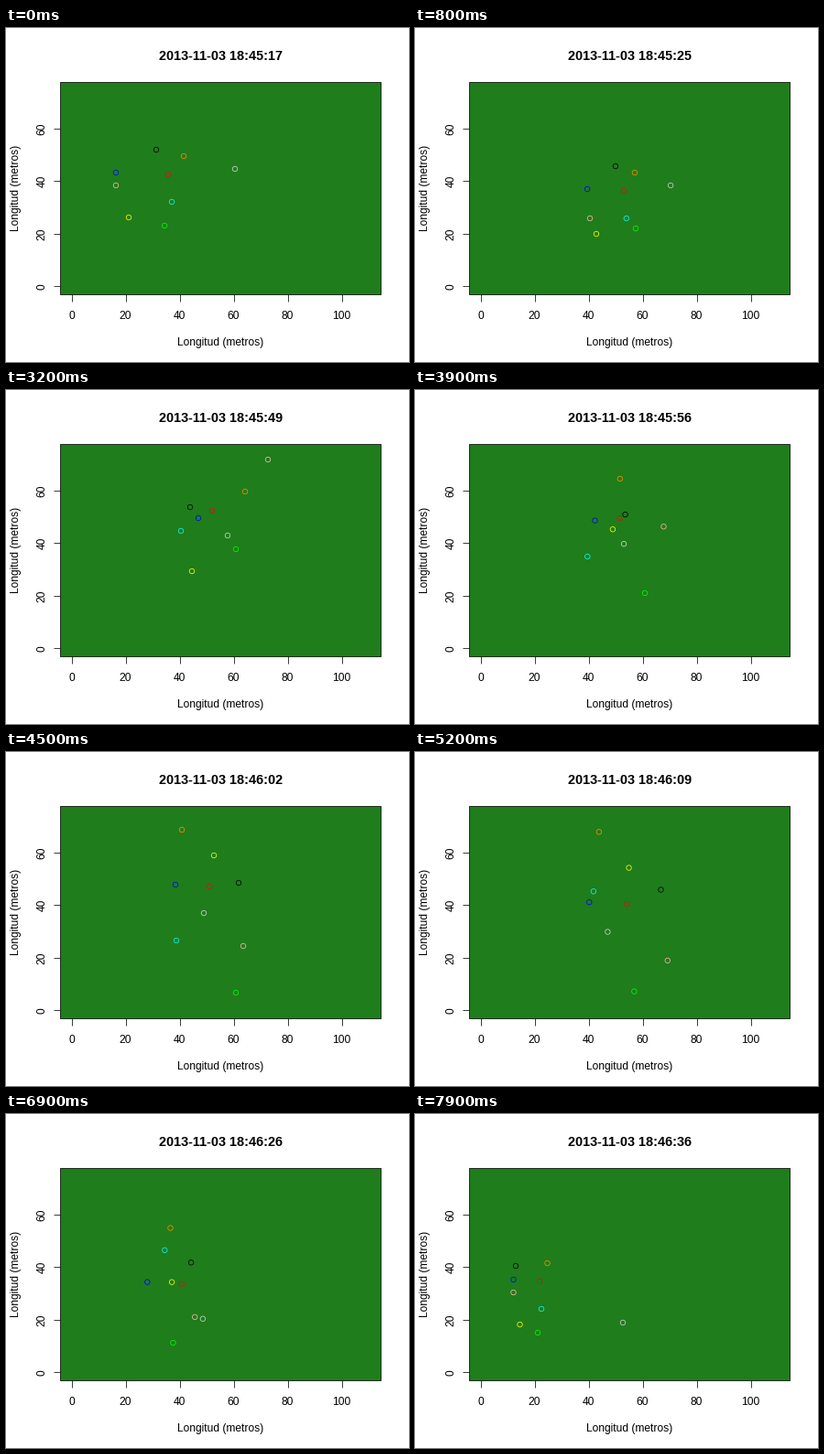
A matplotlib script that plays this animation: 440 px wide and 365 px high, repeating every 8 s.

```python
import numpy as np
import matplotlib.pyplot as plt
from matplotlib.animation import FuncAnimation
from matplotlib.patches import Rectangle

W, H, DPI = 440, 365, 100
FRAMES, STEP = 80, 100
PX = 72 / DPI  # points per pixel
THIN = 0.75 * PX
CLOCK = (18 * 60 + 45) * 60 + 17

# Seconds at which play turns, the pivot's place then (x + yj, pixels),
# and how far the formation is squeezed sideways around the pivot.
TURNS = [0, 8, 20, 32, 45, 60, 79]
PIVOT = [177 + 160j, 228 + 178j, 241 + 176j, 225 + 132j,
         222 + 147j, 242 + 188j, 136 + 183j]
SQUEEZE = [1, 0.7, 0.85, 0.7, 0.65, 0.8, 0.5]

plt.rcParams["font.family"] = "Liberation Sans"
fig = plt.figure(figsize=(W / DPI, H / DPI), dpi=DPI, facecolor="white")
ax = fig.add_axes([0, 0, 1, 1])
ax.set(xlim=(0, W), ylim=(H, 0))
ax.axis("off")


def label(x, y, text, size=12, **kw):
    return ax.text(x, y, text, fontsize=size * PX, ha="center", va="baseline",
                   rotation_mode="anchor", **kw)


def line(xs, ys):
    ax.plot(xs, ys, color="black", lw=THIN, solid_capstyle="butt")


def draw_pitch():
    ax.add_patch(Rectangle((59, 59), 350, 232, fc="#1f7d1c", ec="black",
                           lw=THIN, joinstyle="miter"))
    for v in range(0, 101, 20):
        x = 72 + 2.95 * v
        line([x, x], [291, 299])
        label(x - 0.4, 318, str(v))
    for v in range(0, 61, 20):
        y = 282.3 - 2.875 * v
        line([52, 59], [y, y])
        label(42.6, y, str(v), rotation=90)
    label(234.5, 347, "Longitud (metros)")
    label(13.8, 175, "Longitud (metros)", rotation=90)


def track(home=0, runs={}, start=0, end=FRAMES):
    """Path around the pivot: the home offset, except where a run replaces it."""
    stops = [p + runs.get(t, complex(home.real * s, home.imag))
             for t, p, s in zip(TURNS, PIVOT, SQUEEZE)]
    now = np.arange(FRAMES)
    z = np.interp(now, TURNS, stops)
    z[(now < start) | (now > end)] = np.nan
    return z


players = {
    "black": track(-13 - 27j, {20: -14 - 42j, 32: -24 - 4j, 45: 32 - 4j,
                               60: 43 - 29j, 79: -26 - 17j}),
    "#e0100a": track(),
    "#00ff00": track(-4 + 56j, {8: 13 + 41j, 20: 28 + 68j, 32: 26 + 42j,
                                45: 29 + 116j, 60: -16 + 72j}),
    "blue": track(-57 - 2j, {32: -15 + 8j}),
    "cyan": track(4 + 30j, {20: -57 + 52j, 32: -34 + 22j, 45: -36 + 59j,
                            60: -37 - 97j}),
    "yellow": track(-43 + 47j, {20: -32 + 80j, 32: -22 + 66j, 45: 5 - 34j,
                                60: -1 - 46j}),
    "#ff8c00": track(17 - 20j, {20: 29 - 25j, 32: 36 - 21j, 45: -30 - 62j,
                                60: -31 - 98j}),
    "#ffb6a8": track(-57 + 12j, {8: -37 + 30j, 20: 45 - 100j, 32: 61 - 56j,
                                 45: 37 + 65j, 60: 53 + 58j}),
    "#d3d3d3": track(73 - 6j, {20: -1 + 53j, 32: 17 + 27j, 45: -6 + 29j,
                               60: -38 + 32j, 79: 91 + 45j}),
    "#a6a6a6": track(45 + 14j, {32: 69 - 21j, 45: 61 + 15j, 60: 3 + 24j},
                     start=14, end=68),
    "#ee4f9a": track(63 + 70j, start=53, end=63),
}
paths = np.array(list(players.values()))

draw_pitch()
title = label(234.2, 35, "", 14.4, weight="bold")
rings = ax.scatter(paths[:, 0].real, paths[:, 0].imag, s=(5.5 * PX) ** 2,
                   facecolors="none", edgecolors=list(players), linewidths=THIN,
                   zorder=5, snap=False)


def update(i):
    s = CLOCK + i
    title.set_text(f"2013-11-03 {s // 3600:02d}:{s // 60 % 60:02d}:{s % 60:02d}")
    rings.set_offsets(np.column_stack([paths[:, i].real, paths[:, i].imag]))
    return title, rings


anim = FuncAnimation(fig, update, frames=FRAMES, interval=STEP, repeat=True,
                     repeat_delay=0)
plt.show()
```
